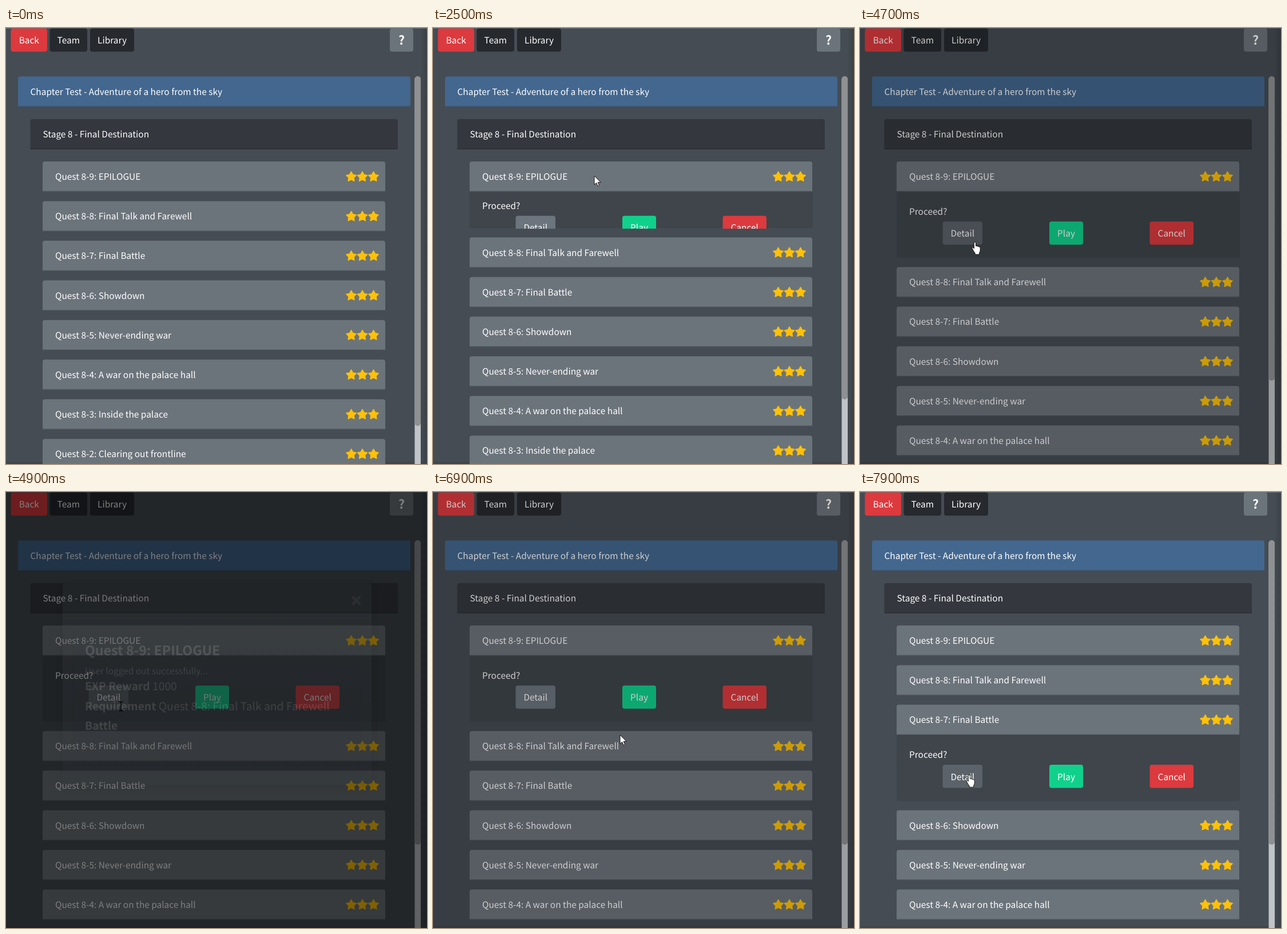
Write an HTML page that moves like this. It is 736 by 761 pixels and loops after 8 s.

```html
<!DOCTYPE html>
<html lang="en">
<head>
<meta charset="utf-8">
<title>Quest list</title>
<style>
  html, body { margin: 0; width: 100%; height: 100%; overflow: hidden; background: #454c53; }
  svg { display: block; width: 736px; height: 761px; }
  text {
    font: 15.43px "Noto Sans CJK JP", "Noto Sans CJK SC", "Noto Sans CJK", "Open Sans", sans-serif;
    fill: #fff; text-rendering: geometricPrecision; white-space: pre;
  }
  .mid { text-anchor: middle; }
  .bold { font-weight: 700; }
  .title { font-size: 23.15px; font-weight: 700; }
  .large { font-size: 19.3px; }
</style>
</head>
<body>
<svg id="stage" viewBox="0 0 736 761" xmlns="http://www.w3.org/2000/svg"></svg>
<script>
const LOOP = 8000;
const ROW_TOP = 233, ROW_STEP = 69.17, ROW_H = 52, PANEL_H = 115, PANEL_PAD = 22;
const quests = [
  'Quest 8-9: EPILOGUE', 'Quest 8-8: Final Talk and Farewell', 'Quest 8-7: Final Battle',
  'Quest 8-6: Showdown', 'Quest 8-5: Never-ending war', 'Quest 8-4: A war on the palace hall',
  'Quest 8-3: Inside the palace', 'Quest 8-2: Clearing out frontline'
];

const box = (x, y, w, h, fill, r = 0, extra = '') =>
  `<rect x="${x}" y="${y}" width="${w}" height="${h}" rx="${r}" fill="${fill}" ${extra}/>`;
const label = (x, y, text, cls = '') => `<text x="${x}" y="${y}" class="${cls}">${text}</text>`;
const button = (x, y, w, fill, text, extra = '') =>
  box(x, y, w, 40.5, fill, 4, extra) + label(x + w / 2, y + 26.5, text, 'mid');
const topRounded = (x, y, w, h, fill, line) =>
  `<path d="M${x} ${y + h}v${4 - h}q0-4 4-4h${w - 8}q4 0 4 4v${h - 4}z" fill="${fill}"/>` +
  box(x, y + h - 0.6, w, 1.2, line);

function star(cx, cy) {
  const points = Array.from({ length: 10 }, (_, k) => {
    const r = k % 2 ? 4.7 : 8.9, a = Math.PI * (k / 5 - 0.5);
    return `${(cx + r * Math.cos(a)).toFixed(2)},${(cy + r * Math.sin(a)).toFixed(2)}`;
  });
  return `<polygon points="${points.join(' ')}" fill="#ffc107" stroke="#ffc107" stroke-width="1.7" stroke-linejoin="round"/>`;
}

const panel = i => `
  <clipPath id="clip${i}"><rect id="mask${i}" x="62" y="52" width="604" height="0"/></clipPath>
  <g id="panel${i}" clip-path="url(#clip${i})">
    <rect id="fill${i}" x="64" y="48" width="600" height="0" rx="4" fill="#3f454b"/>
    <g id="content${i}">
      ${label(86, 93, 'Proceed?')}
      ${button(144.5, 104.7, 69.5, '#6c757d', 'Detail', `id="detail${i}"`)}
      ${button(331, 104.7, 59, '#10d18c', 'Play')}
      ${button(506.5, 104.7, 76.5, '#dc3a3e', 'Cancel')}
    </g>
  </g>`;

const row = (name, i) => `<g id="row${i}">
  ${i === 0 || i === 2 ? panel(i) : ''}
  ${topRounded(64, 0, 599, ROW_H, '#6c747b', '#555c63')}
  ${label(86, 32, name)}
  ${[603.6, 623, 642.5].map(x => star(x, 26.8)).join('')}
</g>`;

const modal = `<g id="modal">
  ${box(99, 206, 540, 352, 'url(#dialog)', 4, 'filter="url(#shadow)"')}
  ${box(99, 266.5, 540, 1, '#74797e')}
  ${box(117, 284.5, 505, 240, 'url(#card)', 4, 'stroke="#000" stroke-opacity=".14"')}
  <path d="M605.5 229l14 14m0-14l-14 14" stroke="#92969a" stroke-width="4.6"/>
  ${label(138, 331.5, quests[0], 'title')}
  ${label(138, 365, 'User logged out successfully...')}
  ${label(138, 393, '<tspan class="bold">EXP Reward </tspan>1000', 'large')}
  ${label(138, 427.5, '<tspan class="bold">Requirement </tspan>' + quests[1], 'large')}
  ${label(138, 462, 'Battle', 'large bold')}
  ${label(138, 495, '-')}
</g>`;

const cursors = `<g id="cursor">
  <path id="arrow" d="M0 0v15.5l3.6-3.3 2.5 5.6 2.5-1.1-2.5-5.4h5z" fill="#fff" stroke="#111"/>
  <path id="hand" d="M-1.7 11V1.5q0-1.8 1.6-1.8t1.6 1.8v5q2.5-.8 3 .7 2-.6 2.5.8 2-.3 2.2 1.6v4.6q0 2-1.5 4v3h-7.6v-2.5q-2-2-3.2-4.6l-2-3.8q0-2 1.6-1.4z" fill="#fff" stroke="#111"/>
  <path id="beam" d="M-3.5-8h2.5q1 0 1 1 0-1 1-1h2.5M0-7V7M-3.5 8h2.5q1 0 1-1 0 1 1 1h2.5" fill="none" stroke="#07080a" stroke-width="1.4"/>
</g>`;

const stage = document.getElementById('stage');
stage.innerHTML = `
  <defs>
    <linearGradient id="edge"><stop stop-color="#434a51"/><stop offset="1" stop-color="#3b4147"/></linearGradient>
    <linearGradient id="dialog" x2="0" y2="1"><stop stop-color="#51565b"/><stop offset=".25" stop-color="#4d5359"/><stop offset="1" stop-color="#353a42"/></linearGradient>
    <linearGradient id="card" x2="0" y2="1"><stop stop-color="#4c5258"/><stop offset="1" stop-color="#353a42"/></linearGradient>
    <filter id="shadow" x="-10%" y="-10%" width="120%" height="125%"><feDropShadow dx="0" dy="5" stdDeviation="8" flood-opacity=".5"/></filter>
  </defs>
  ${box(0, 0, 736, 761, '#454c53')}
  ${box(726, 0, 10, 761, 'url(#edge)')}
  ${box(0, 758, 736, 3, '#3e444c')}
  ${box(0, 0, 736, 1, '#6a7077')}
  ${button(8.5, 0.7, 63.5, '#dc3a3e', 'Back')}
  ${button(76.5, 0.7, 65.5, '#26292e', 'Team')}
  ${button(147, 0.7, 77, '#26292e', 'Library')}
  ${box(671, 0.7, 41, 40.5, '#6c747b', 4)}
  <text x="691.5" y="29" class="mid" style="font-size:21.5px;font-weight:900">?</text>
  ${topRounded(21, 84.5, 686, 52, '#43678f', '#3a5b80')}
  ${label(42.5, 116.7, 'Chapter Test - Adventure of a hero from the sky')}
  ${topRounded(42.5, 159, 642.5, 52, '#34383e', '#282c31')}
  ${label(64.5, 191, 'Stage 8 - Final Destination')}
  ${quests.map(row).join('')}
  ${box(714.5, 84.5, 10.5, 690, '#c0c4c8', 5)}
  ${box(714.5, 84.5, 10.5, 610, '#8e9092', 5, 'id="thumb"')}
  ${box(0, 0, 736, 761, '#000', 0, 'id="backdrop"')}
  ${modal}${cursors}`;

const $ = id => document.getElementById(id);
const set = (id, name, value) => $(id).setAttribute(name, value);
const ramp = (t, from, to) => Math.min(1, Math.max(0, (t - from) / (to - from)));
const swing = x => 0.5 - Math.cos(Math.PI * x) / 2;
const easeOut = x => 1 - (1 - x) ** 2;
const slide = (t, start) => swing(ramp(t, start, start + 400));
const within = (t, from, to) => t >= from && t < to;

// Pointer stops: time, x, y
const stops = [
  [150, 430, 765], [1000, 400, 560], [1900, 290, 275], [2250, 282, 258], [2700, 282, 258],
  [3500, 247, 340], [4200, 201, 374], [5050, 201, 374], [6000, 504, 286], [6350, 612, 236],
  [6500, 612, 236], [6900, 327, 424], [7120, 270, 508], [7350, 270, 508], [7800, 191, 494]
];

function pointerAt(t) {
  const next = stops.findIndex(s => s[0] > t);
  if (next < 1) return stops[next < 0 ? stops.length - 1 : 0].slice(1);
  const [t0, x0, y0] = stops[next - 1], [t1, x1, y1] = stops[next];
  const k = swing(ramp(t, t0, t1));
  return [x0 + (x1 - x0) * k, y0 + (y1 - y0) * k];
}

function pointerShape(t) {
  if (within(t, 3950, 4870) || within(t, 6270, 6530) || t >= 7600) return 'hand';
  return within(t, 4870, 5150) ? 'beam' : 'arrow';
}

function setPanel(i, open, hover) {
  const h = PANEL_H * open;
  set('panel' + i, 'visibility', open > 0 ? 'visible' : 'hidden');
  set('mask' + i, 'height', h + 2);
  set('fill' + i, 'height', h + 5);
  set('content' + i, 'transform', `translate(0 ${-PANEL_PAD * (1 - open)})`);
  set('detail' + i, 'fill', hover ? '#5b6269' : '#6c757d');
}

function render(t) {
  const first = slide(t, 2288) - slide(t, 7150), third = slide(t, 7150);
  setPanel(0, first, within(t, 3950, 5000));
  setPanel(2, third, t >= 7600);
  quests.forEach((_, i) => {
    const push = PANEL_H * ((i > 0 ? first : 0) + (i > 2 ? third : 0));
    set('row' + i, 'transform', `translate(0 ${ROW_TOP + ROW_STEP * i + push})`);
  });
  set('thumb', 'height', 610 * 772 / (772 + PANEL_H * (first + third)));

  set('backdrop', 'opacity', 0.5 * (ramp(t, 4600, 4850) - ramp(t, 6810, 6960)));
  const drop = easeOut(ramp(t, 4880, 5180)) - easeOut(ramp(t, 6500, 6800));
  set('modal', 'opacity', ramp(t, 4880, 5030) - ramp(t, 6500, 6650));
  set('modal', 'transform', `translate(0 ${-54 * (1 - drop)})`);

  const shape = pointerShape(t);
  set('cursor', 'display', t < 150 ? 'none' : 'inline');
  set('cursor', 'transform', `translate(${pointerAt(t).join(' ')})`);
  for (const id of ['arrow', 'hand', 'beam']) set(id, 'display', id === shape ? 'inline' : 'none');
}

const start = performance.now();
function tick() {
  render((performance.now() - start) % LOOP);
  requestAnimationFrame(tick);
}
tick();
</script>
</body>
</html>
```
